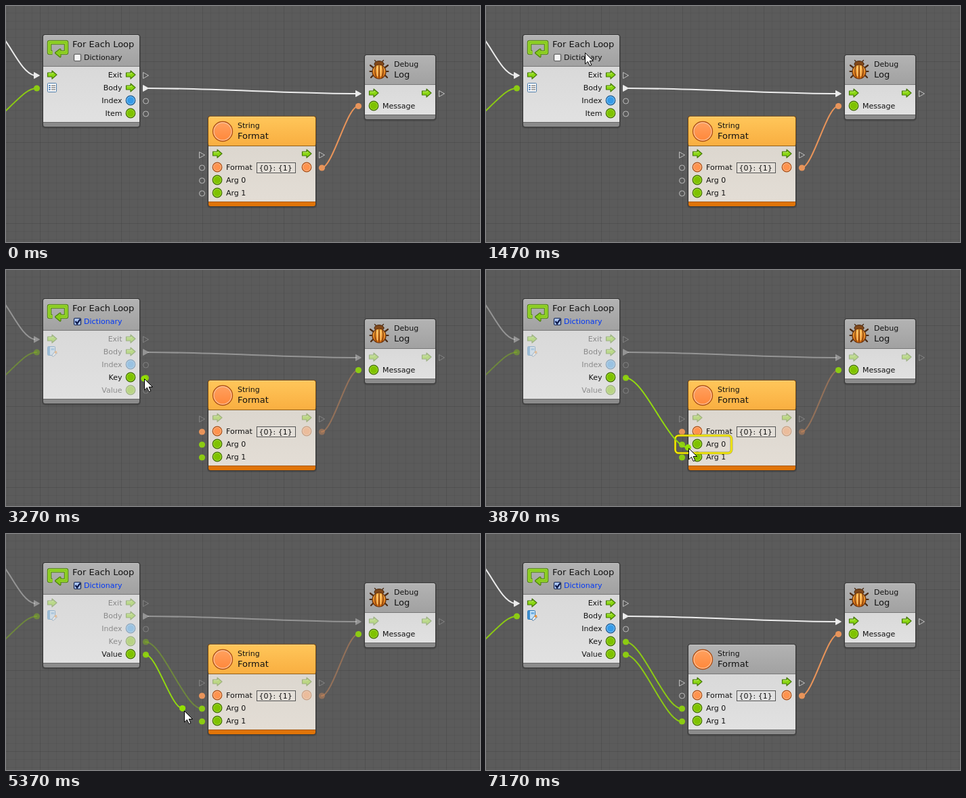
An HTML page for the animation above (8610 ms loop, 700 by 350 pixels).

```html
<!DOCTYPE html>
<html lang="en">
<head>
<meta charset="utf-8">
<title>Node graph: looping over a dictionary</title>
<style>
  html, body { margin: 0; width: 100%; height: 100%; overflow: hidden; background: #5b5b5b; }
  svg { display: block; width: 700px; height: 350px; }
  text { font: 11px "DejaVu Sans", Verdana, sans-serif; fill: #111; }
  .title { font-size: 13px; }
  .right { text-anchor: end; }
  .wire { fill: none; stroke-width: 2; stroke-linecap: round; }
  .dim { opacity: .4; }
</style>
</head>
<body>
<svg viewBox="0 0 700 350" xmlns="http://www.w3.org/2000/svg">
  <defs>
    <pattern id="minor" x="50" y="82" width="12" height="12" patternUnits="userSpaceOnUse">
      <path d="M.5 0V12M0 .5H12" stroke="#000" stroke-opacity=".05"/>
    </pattern>
    <pattern id="major" x="50" y="82" width="120" height="120" patternUnits="userSpaceOnUse">
      <path d="M.5 0V120M0 .5H120" stroke="#000" stroke-opacity=".06"/>
    </pattern>
    <linearGradient id="gray" x2="0" y2="1"><stop stop-color="#b3b3b3"/><stop offset="1" stop-color="#a1a1a1"/></linearGradient>
    <linearGradient id="amber" x2="0" y2="1"><stop stop-color="#ffc65a"/><stop offset="1" stop-color="#f9ae40"/></linearGradient>
    <linearGradient id="grayBody" x2="0" y2="1"><stop stop-color="#d9d9d9"/><stop offset="1" stop-color="#e1e1e1"/></linearGradient>
    <linearGradient id="amberBody" x2="0" y2="1"><stop stop-color="#dcd7cf"/><stop offset="1" stop-color="#e3ddd5"/></linearGradient>
    <linearGradient id="shell" x2="0" y2="1"><stop stop-color="#ffb648"/><stop offset="1" stop-color="#d2660c"/></linearGradient>
    <linearGradient id="ball" x2="0" y2="1"><stop stop-color="#ffa15f"/><stop offset="1" stop-color="#ff873a"/></linearGradient>
  </defs>
  <rect width="700" height="350" fill="#5b5b5b"/>
  <rect width="700" height="350" fill="url(#minor)"/>
  <rect width="700" height="350" fill="url(#major)"/>
  <g id="scene"></g>
  <g id="live"></g>
  <path id="cursor" d="M0 0V16.5L3.9 12.9 6.7 19 9.3 17.9 6.6 12H12Z" fill="#fff" stroke="#000" stroke-linejoin="round"/>
</svg>
<script>
const LOOP = 8610;
const GREEN = '#8ccb12', ORANGE = '#e8945a', WHITE = '#ececec', FRESH = [232, 222, 0], SETTLED = [140, 203, 18];
const KEY = [206, 160], VALUE = [206, 179], ARG0 = [289, 259], ARG1 = [289, 278];

// Pointer keys: time, x, y, starting speed of the move to the next key
const track = [
  [30, 348, 349, 1.4], [830, 175, 134, 1], [870, 174, 126, 1.6], [1200, 146, 70, 1],
  [1469, 146, 70, 1], [1470, 146, 69, 1], [1869, 146, 69, 1], [1870, 146, 70, 1],
  [2200, 146, 70, 1], [2330, 158, 84, 1.2], [3030, 204, 161, 1], [3270, 204, 161, 1.6], [3870, 299, 264, 1],
  [4230, 299, 264, 1.2], [4730, 205, 181, 1], [5030, 205, 181, .7], [5370, 263, 262, 1.6],
  [5670, 297, 285, 1], [6470, 297, 285, .6], [7170, 128, 352, 1]
];

const $ = id => document.getElementById(id);
const clamp = v => Math.max(0, Math.min(1, v));
const group = (s, dim) => dim ? `<g class="dim">${s}</g>` : s;
const label = (s, x, y, cls = '', fill = '#111') => `<text x="${x}" y="${y}" class="${cls}" style="fill:${fill}">${s}</text>`;
const box = (x, y, w, h, attrs) => `<rect x="${x}" y="${y}" width="${w}" height="${h}" ${attrs}/>`;
const dot = ([x, y], color) => `<circle cx="${x + .5}" cy="${y}" r="4.6" fill="${color}"/>`;
const ring = ([x, y]) => `<circle cx="${x + .5}" cy="${y}" r="4" fill="none" stroke="#bdbdbd"/>`;

function wire([x0, y0], [x1, y1], color) {
  const pull = (x1 - x0) * .3;
  return `<path class="wire" d="M${x0} ${y0}C${x0 + pull} ${y0} ${x1 - pull} ${y1} ${x1} ${y1}" stroke="${color}"/>`;
}

function flowEnd(x, y, filled) {
  const style = filled ? `fill="${WHITE}" stroke="${WHITE}"` : 'fill="none" stroke="#bdbdbd"';
  return `<path d="M${x + .5} ${y - 4.5}L${x + 8.5} ${y}L${x + .5} ${y + 4.5}Z" ${style} stroke-linejoin="round"/>`;
}

const arrow = (x, y) =>
  `<path d="M${x - 6.5} ${y - 3}h6.500v-3l7 6l-7 6v-3h-6.500z" fill="#8ad612" stroke="#457708" stroke-width="1.2" stroke-linejoin="round"/>
   <path d="M${x - 5.3} ${y - 1.6}h6.500v-1.400" fill="none" stroke="#b9ee62"/>`;

function knob(x, y, kind) {
  const [fill, edge, rim] = {
    green: ['#7fc200', '#416a00', '#9fdb35'],
    blue: ['#379be8', '#1c578b', '#7cc4f8'],
    orange: ['#ff934e', '#a84c12', '#ffb98c']
  }[kind];
  return `<circle cx="${x}" cy="${y}" r="6.8" fill="${fill}" stroke="${edge}" stroke-width="1.2"/>
    <circle cx="${x}" cy="${y}" r="5.6" fill="none" stroke="${rim}"/>`;
}

function node(x, y, w, h, head, tone = 'gray') {
  const [foot, edge, seam] = tone === 'gray' ? ['#8b8b8b', '#393939', '#777'] : ['#e07408', '#805316', '#8f5f1c'];
  return box(x - 2, y - 1, w + 4, h + 4, 'rx="5" fill="#000" opacity=".14"') +
    box(x - 1, y - 1, w + 2, h + 2, 'rx="4" fill="#393939"') +
    box(x - 1, y - 1, w + 2, head, `rx="4" fill="${edge}"`) +
    box(x, y, w, h, `rx="3" fill="${foot}"`) +
    box(x, y, w, head, `rx="3" fill="url(#${tone})"`) +
    box(x, y + head, w, h - head - 7, `fill="url(#${tone}Body)"`) +
    box(x, y + head - 1, w, 1, `fill="${seam}"`) +
    box(x, y + h - 7, w, 1, 'fill="#000" opacity=".25"') +
    box(x + 2, y, w - 4, 1, 'fill="#fff" opacity=".25"');
}

function loopIcon() {
  const d = 'M68.5 69H64V54H89V69H79', head = 'M80 64.5L73.5 69.5L80 75Z';
  return `<g fill="none" stroke-linejoin="round">
    <path d="${d}" stroke="#477d08" stroke-width="6.4"/><path d="${head}" fill="#477d08" stroke="#477d08" stroke-width="3"/>
    <path d="${d}" stroke="#a9e044" stroke-width="4.4"/><path d="${d}" stroke="#86cb1b" stroke-width="2.6"/>
    <path d="${head}" fill="#86cb1b" stroke="#86cb1b"/></g>`;
}

function bugIcon() {
  return `<g fill="none" stroke="#4a2a12" stroke-width="2.2" stroke-linecap="round">
    <path d="M542 91L538 88M541 97H537.500M542 103L539 106M560 91L564 88M561 97H564.500M560 103L563 106" />
    <path d="M547 83L544.500 80.500M555 83L557.500 80.500" stroke-width="1.4"/>
    <ellipse cx="551" cy="86" rx="7" ry="4.5" fill="#80481a" stroke-width="1"/>
    <ellipse cx="551" cy="97.500" rx="10" ry="10.500" fill="url(#shell)" stroke="#6b3510" stroke-width="1.2"/>
    <path d="M551 88V107M546 89.500Q543.500 98 547 106M556 89.500Q558.500 98 555 106" stroke="#7a3b0d" stroke-width="1.3"/>
    <path d="M548.500 90V104M553.500 90V104" stroke="#ffd685" stroke-width="1.2"/></g>`;
}

function listIcon() {
  let rows = '';
  for (const y of [117, 120, 123]) rows += box(63.5, y, 2, 2, 'fill="#2f6db0"') + box(67, y + .5, 6, 1, 'fill="#555"');
  return box(61.5, 114.5, 13, 13, 'rx="1" fill="#fafafa" stroke="#4a7aa8"') + rows;
}

function bookIcon() {
  return box(61.5, 113.5, 11, 13, 'rx="1" fill="#c3e0f7" stroke="#3079b5"') +
    box(62, 114, 3, 12, 'fill="#3d8fd1"') + box(66.5, 116, 4.5, 3, 'fill="#6caee2"') +
    '<path d="M67.500 127L72.500 120.500L75.500 123L70 128.500Z" fill="#f5f5f5" stroke="#3a6f9e" stroke-width=".9"/><circle cx="73.500" cy="122" r="1.9" fill="#e8933c"/>';
}

function loopNode(s) {
  const drag = s.drag, ink = s.focus ? '#0036f5' : '#111';
  const rows = s.dict ? ['Exit', 'Body', 'Index', 'Key', 'Value'] : ['Exit', 'Body', 'Index', 'Item'];
  let out = node(55, 43, 142, s.dict ? 155 : 136, 47) + loopIcon() +
    label('For Each Loop', 98, 61, 'title') +
    box(100.5, 71.5, 10, 10, `rx="1.5" fill="${s.focus ? '#a9c4f5' : '#f4f4f4'}" stroke="${s.focus ? '#17264f' : '#555'}" stroke-width="1.2"`) +
    label('Dictionary', 115, 80, '', ink);
  if (s.dict) out += '<path d="M102.500 76L105 79.500L109.500 73" fill="none" stroke="#0d1a4a" stroke-width="2.2"/>';
  out += group(arrow(68, 102) + (s.dict ? bookIcon() : listIcon()) + flowEnd(41, 103, true) + dot([45, 122], GREEN), drag);
  rows.forEach((name, i) => {
    const y = 102 + 19 * i, end = [206, y + 1];
    const wired = name === 'Key' && s.key || name === 'Value' && s.value || name === drag;
    const icon = i < 2 ? arrow(184, y) : knob(184, y, i === 2 ? 'blue' : 'green');
    const outer = i < 2 ? flowEnd(202, y + 1, i === 1) : wired ? dot(end, GREEN) : ring(end);
    out += group(label(name, 171.5, y + 4, 'right') + icon + outer, drag && name !== drag);
  });
  return out;
}

function formatNode(s) {
  const drag = s.drag, tone = s.value ? 'gray' : 'amber';
  const input = (p, color, on) => on || drag ? dot(p, color) : ring(p);
  return node(299, 164, 158, 133, 44, tone) +
    '<circle cx="320" cy="186" r="14.500" fill="url(#ball)" stroke="#a94e16" stroke-width="1.300"/><circle cx="320" cy="186" r="13" fill="none" stroke="#ffbd91" stroke-width="1.300"/>' +
    label('String', 342, 181) + label('Format', 342, 197, 'title') +
    group(arrow(312, 219) + arrow(444, 219) + flowEnd(285, 221) + flowEnd(462, 221) +
      knob(444, 239, 'orange') + dot([466, 240], ORANGE), drag) +
    knob(312, 239, 'orange') + knob(312, 258, 'green') + knob(312, 277, 'green') +
    label('Format', 325, 243) + label('Arg 0', 325, 262) + label('Arg 1', 325, 281) +
    box(370.5, 232.5, 57, 15, 'fill="#fff" fill-opacity=".15" stroke="#555"') + label('{0}: {1}', 373.5, 244) +
    input([289, 240], ORANGE, false) + input(ARG0, GREEN, s.key) + input(ARG1, GREEN, s.value);
}

function logNode({ drag }) {
  return node(530, 73, 104, 95, 44) + bugIcon() + label('Debug', 573, 90) + label('Log', 573, 106, 'title') +
    group(arrow(543, 129) + arrow(621, 129) + flowEnd(516, 130, true) + flowEnd(639, 130), drag) +
    knob(543, 148, 'green') + label('Message', 556, 152) + dot([520, 148.5], drag ? GREEN : ORANGE);
}

function scene(s) {
  const wires = `<path class="wire" d="M-2 50C12 69 25 99 42 103" stroke="${WHITE}"/>
    <path class="wire" d="M45 122C33 122 23 133 -2 157" stroke="${GREEN}"/>` +
    wire([210, 122], [517, 130], WHITE) + wire([466, 240], [520, 148.5], ORANGE) +
    (s.key ? wire(KEY, ARG0, GREEN) : '') + (s.value ? wire(VALUE, ARG1, GREEN) : '');
  return loopNode(s) + formatNode(s) + group(wires, s.drag) + logNode(s);
}

function pointer(t) {
  const i = track.findIndex(k => k[0] > t);
  if (i < 0) return track[track.length - 1].slice(1, 3);
  if (i === 0) return track[0].slice(1, 3);
  const [t0, x0, y0, speed] = track[i - 1], [t1, x1, y1] = track[i];
  const u = (t - t0) / (t1 - t0), p = u * (speed + (1 - speed) * u);
  return [x0 + (x1 - x0) * p, y0 + (y1 - y0) * p];
}

function freshWire(from, to, age) {
  const p = clamp(age);
  const color = `rgb(${FRESH.map((c, i) => Math.round(c + (SETTLED[i] - c) * p))})`;
  return wire(from, to, color) + dot(from, color) + dot(to, color);
}

function liveLayer(t, drag) {
  if (drag) {
    const from = drag === 'Key' ? KEY : VALUE, end = pointer(t - 12);
    const [x, y] = pointer(t), row = y < 268 ? 245.5 : 264.5;
    const hover = x > 278 && y > 245;
    return (hover ? box(279.5, row, 83, 26, 'rx="5" fill="none" stroke="#6b6400" stroke-opacity=".5" stroke-width="4"') +
      box(279.5, row, 83, 26, 'rx="5" fill="none" stroke="#f2e600" stroke-width="2.6"') : '') +
      wire(from, end, '#92d90f') + dot([end[0] - .5, end[1]], '#92e000');
  }
  if (t >= 4230 && t < 4730) return freshWire(KEY, ARG0, (t - 4230) / 500);
  if (t >= 5930 && t < 7100) return freshWire(VALUE, ARG1, (t - 6470) / 600);
  return '';
}

let shown = '';
function draw(t) {
  const drag = t >= 3270 && t < 4230 ? 'Key' : t >= 5030 && t < 5930 ? 'Value' : '';
  const state = { drag, focus: t >= 1730, dict: t >= 1870, key: t >= 4230, value: t >= 5930 };
  const id = JSON.stringify(state);
  if (id !== shown) {
    $('scene').innerHTML = scene(state);
    shown = id;
  }
  $('live').innerHTML = liveLayer(t, drag);
  const [x, y] = pointer(t);
  $('cursor').setAttribute('transform', `translate(${Math.round(x) + .5} ${Math.round(y) + .5})`);
  $('cursor').style.display = t >= 30 && t < 7170 ? '' : 'none';
}

const start = performance.now();
function tick() {
  draw((performance.now() - start) % LOOP);
  requestAnimationFrame(tick);
}
tick();
</script>
</body>
</html>
```
